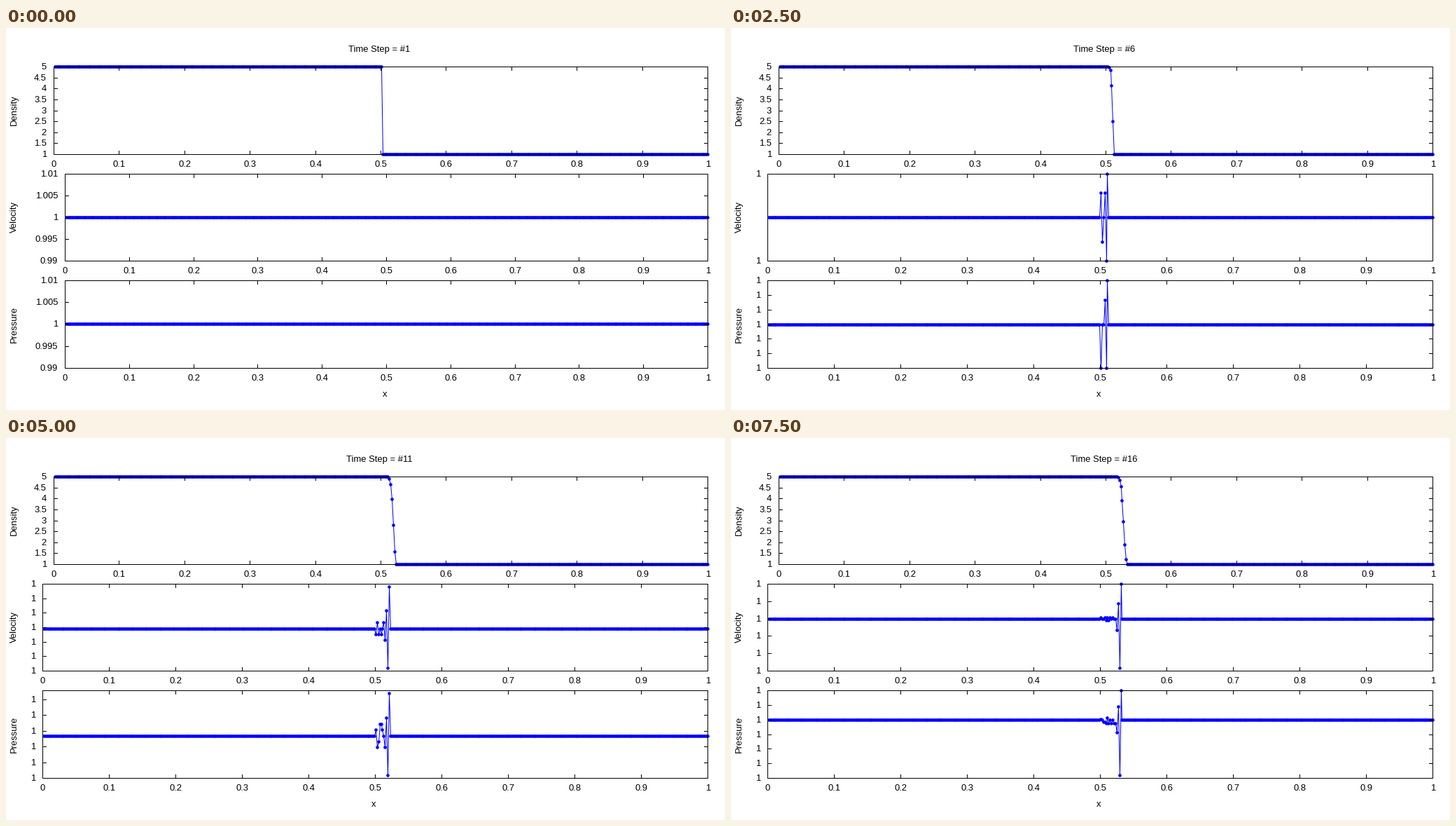
Animation, 1027 px wide and 545 px high, one loop 8 s. Source, as a matplotlib script:

```python
import numpy as np
import matplotlib.pyplot as plt
from matplotlib.animation import FuncAnimation
from matplotlib.collections import EllipseCollection

WIDTH, HEIGHT, DPI = 1027, 545, 64
PX = 72 / DPI
STEPS, CELLS, JUMP = 16, 499, 250
COURANT = 0.822
RIGHT = 1002
BLUE = "#0000ff"

plt.rcParams["font.family"] = "Liberation Sans"
plt.rcParams["font.size"] = 13 * PX

fig = plt.figure(figsize=(WIDTH / DPI, HEIGHT / DPI), dpi=DPI, facecolor="white")
ax = fig.add_axes([0, 0, 1, 1])

cells = np.arange(1, CELLS + 1)
FLAT_LABELS = ["0.99", "0.995", "1", "1.005", "1.01"]
DENSITY_LABELS = [f"{v:g}" for v in np.arange(1, 5.1, 0.5)]

# Autoscaling: height of the value 1 and tick spacing, up to each step
SCALE_STEPS = [4, 6, 10, 12, 14, 16]
VELOCITY = dict(top=208, bottom=332, noise=1,
                rest=[332, 270, 270, 272, 271, 258],
                spacing=[124, 124, 124, 20.7, 16.8, 24.8])
PRESSURE = dict(top=360, bottom=485, noise=2,
                rest=[423, 423, 440, 425, 416, 402],
                spacing=[20.8, 20.8, 25, 22.4, 14, 20.8])


def density(step):
    rho = np.where(cells <= JUMP, 5.0, 1.0)
    for _ in range(step - 1):
        rho[1:] += COURANT * (rho[:-1] - rho[1:])
    return rho


def ripple(step, noise):
    """Round-off wave in -1..1: a decaying train behind the front, then noise."""
    front = JUMP - 1 + step
    quantum = min(1, 0.75 ** (step - 4))
    behind = front - cells
    age = np.maximum(behind, 0)
    train = (-1.0) ** age * np.minimum(1, 0.95 * np.exp(-0.75 * (age - 1)))
    wave = quantum * np.round(train / quantum)
    rng = np.random.default_rng(step + noise)
    grain = quantum * rng.integers(-noise, noise + 1, CELLS)
    wave = np.where(behind > 3, grain, wave)
    wave[(behind < 0) | (cells < JUMP)] = 0
    return np.clip(wave, -1, 1)


def line(x, y, color="black", zorder=3):
    ax.plot(x, y, color=color, lw=PX, snap=False, zorder=zorder,
            solid_capstyle="projecting")


def dots(x, y, size=4.6):
    sizes = np.full(len(x), size)
    ax.add_collection(EllipseCollection(
        sizes, sizes, np.zeros(len(x)), units="xy", offsets=np.c_[x, y],
        offset_transform=ax.transData, facecolor=BLUE, edgecolor="none",
        zorder=2), autolim=False)


def panel(name, left, top, bottom, y, ticks, labels):
    px = np.round(left + (RIGHT - left) * cells / CELLS)
    py = np.round(y)
    line(px, py, BLUE, zorder=1)
    dots(px, py)

    line([left, RIGHT, RIGHT, left, left], [top, top, bottom, bottom, top])
    for tick, label in zip(np.round(ticks), labels):
        line([left, left + 5], [tick, tick])
        line([RIGHT - 5, RIGHT], [tick, tick])
        ax.text(left - 10.5, tick + 3.5, label, ha="right", va="baseline")
    for k in range(11):
        x = round(left + (RIGHT - left) * k / 10)
        line([x, x], [bottom - 5, bottom])
        line([x, x], [top, top + 5])
        ax.text(x, bottom + 17.5, f"{k / 10:g}", ha="center", va="baseline")
    ax.text(14.5, (top + bottom) / 2 - 0.5, name, rotation=90,
            rotation_mode="anchor", ha="center", va="baseline")


def noise_panel(name, step, top, bottom, noise, rest, spacing):
    if step < 3:
        ticks = np.linspace(bottom, top, 5)
        panel(name, 84, top, bottom, np.full(CELLS, ticks[2]), ticks, FLAT_LABELS)
        return
    key = np.searchsorted(SCALE_STEPS, step)
    wave = ripple(step, noise)
    room = np.where(wave > 0, rest[key] - top, bottom - rest[key])
    ticks = np.arange(bottom, top - 1, -spacing[key])
    panel(name, 52, top, bottom, rest[key] - wave * room, ticks, ["1"] * len(ticks))


def draw(frame):
    step = frame + 1
    ax.clear()
    ax.set_xlim(-0.5, WIDTH - 0.5)
    ax.set_ylim(HEIGHT - 0.5, -0.5)
    ax.axis("off")

    ax.text(532.5, 33.5, f"Time Step = #{step}", ha="center", va="baseline")
    panel("Density", 68, 55, 180, 180 - (density(step) - 1) * 125 / 4,
          np.linspace(180, 55, 9), DENSITY_LABELS)
    noise_panel("Velocity", step, **VELOCITY)
    noise_panel("Pressure", step, **PRESSURE)
    ax.text(541 if step < 3 else 525, 525.5, "x", ha="center", va="baseline")
    return []


anim = FuncAnimation(fig, draw, frames=STEPS, interval=500, init_func=lambda: [],
                     repeat=True, repeat_delay=0)
plt.show()
```
